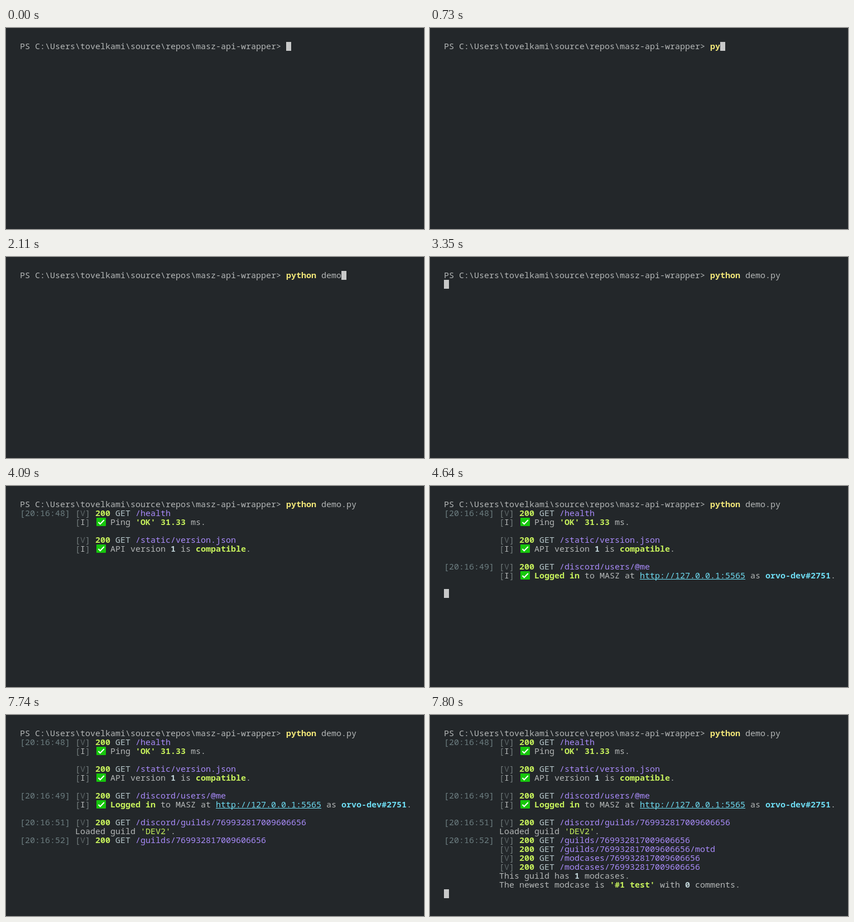
An HTML page for the animation above (8000 ms loop, 749 px wide and 361 px high).

```html
<!DOCTYPE html>
<html lang="en">
<head>
<meta charset="utf-8">
<title>Terminal session</title>
<style>
  html, body { margin: 0; width: 100%; height: 100%; overflow: hidden; background: #23272a; }
  svg { display: block; }
  text { font: 15px "Noto Sans Mono", "DejaVu Sans Mono", monospace; white-space: pre; fill: #b4b7b7; }
  .stamp { fill: #6c7d80; }
  .dim { fill: #737b7d; }
  .faint { fill: #5b6365; }
  .verb { fill: #b4c4c8; }
  .path { fill: #a98bfa; }
  .green { fill: #c6f05c; }
  .cyan { fill: #6edcf2; }
  .light { fill: #bfd2d6; }
  .cmd { fill: #f0e578; }
  .bold { font-weight: 700; }
</style>
</head>
<body>
<svg id="screen" width="749" height="361" viewBox="0 0 749 361"></svg>
<script>
const LOOP = 8000, LEFT = 25, TOP = 25, CELL = 9, LINE = 16;
const screen = document.getElementById('screen');
const colX = c => LEFT + c * CELL;
const rowY = r => TOP + r * LINE;

function add(parent, tag, attrs, content = '') {
  const el = document.createElementNS('http://www.w3.org/2000/svg', tag);
  for (const key in attrs) el.setAttribute(key, attrs[key]);
  el.textContent = content;
  parent.append(el);
  return el;
}

const put = (parent, row, col, content, cls = '') =>
  add(parent, 'text', { x: colX(col), y: rowY(row) + 13, class: cls }, content);

// Runs are [text, class]; each starts where the last one ended.
const lines = [];
function line(row, time, col, runs) {
  const g = add(screen, 'g', {});
  for (const [content, cls] of runs) {
    if (content.trim()) put(g, row, col, content, cls);
    if (cls && cls.includes('link')) {
      add(g, 'rect', { x: colX(col), y: rowY(row) + 14, width: content.length * CELL, height: 1, fill: '#6edcf2' });
    }
    col += content.length;
  }
  lines.push({ g, time });
  return g;
}

function request(row, time, path, stamp) {
  const g = line(row, time, 11, [
    ['[', 'dim'], ['V', 'faint'], [']', 'dim'], [' '],
    ['200', 'green bold'], [' '], ['GET', 'verb'], [' '], [path, 'path']
  ]);
  if (stamp) put(g, row, 0, `[${stamp}]`, 'stamp');
}

function info(row, time, runs) {
  const g = line(row, time, 11, [['[', 'dim'], ['I'], [']', 'dim'], ['    '], ...runs]);
  const x = colX(15) + 2, y = rowY(row);
  add(g, 'rect', { x, y, width: 17, height: 15, rx: 1, fill: '#16c60c' });
  add(g, 'path', { d: `M${x + 3.5} ${y + 8}l3.3 3.3l7-7.3`, fill: 'none', stroke: '#fff', 'stroke-width': 2 });
}

const guild = '769932817009606656';
put(screen, 0, 0, 'PS C:\\Users\\tovelkami\\source\\repos\\masz-api-wrapper>');

request(1, 3770, '/health', '20:16:48');
info(2, 3900, [['Ping '], ["'OK'", 'green bold'], [' '], ['31.33', 'green bold'], [' '], ['ms.']]);
request(4, 4070, '/static/version.json');
info(5, 4090, [['API version '], ['1', 'light bold'], [' '], ['is '], ['compatible', 'green bold'], ['.']]);
request(7, 4170, '/discord/users/@me', '20:16:49');
info(8, 4360, [
  ['Logged in', 'green bold'], [' '], ['to MASZ at '], ['http://127.0.0.1:5565', 'cyan link'],
  [' '], ['as '], ['orvo-dev#2751', 'cyan bold'], ['.']
]);
request(10, 6630, `/discord/guilds/${guild}`, '20:16:51');
line(11, 6730, 11, [['Loaded guild '], ["'DEV2'", 'green'], ['.']]);
request(12, 7740, `/guilds/${guild}`, '20:16:52');
request(13, 7760, `/guilds/${guild}/motd`);
request(14, 7780, `/modcases/${guild}`);
request(15, 7800, `/modcases/${guild}`);
line(16, 7800, 11, [['This guild has '], ['1', 'light bold'], [' '], ['modcases.']]);
line(17, 7800, 11, [['The newest modcase is '], ["'#1 test'", 'green bold'], [' '], ['with '], ['0', 'light bold'], [' '], ['comments.']]);

// Each key hides the cursor for a moment.
const PROMPT = 53, BLINK = 20;
const keys = [600, 710, 930, 1220, 1460, 1550, 1640, 1770, 1880, 1990, 2110, 2360, 2490, 2620];
const program = put(screen, 0, PROMPT, '', 'cmd bold');
const file = put(screen, 0, PROMPT + 7, '');
const cursor = add(screen, 'rect', { width: CELL, height: LINE, fill: '#c8c9c9' });

// Cursor row after Enter; -1 is hidden.
const rows = [
  [3350, 1], [3770, -1], [3790, 2], [3900, -1], [4380, 9], [4620, -1],
  [4640, 10], [6630, 11], [6730, 12], [7740, -1], [7800, 18]
];

function draw(t) {
  const typed = keys.filter(k => k <= t).length;
  program.textContent = 'python'.slice(0, typed);
  file.textContent = 'demo.py'.slice(0, Math.max(0, typed - 7));
  for (const { g, time } of lines) g.setAttribute('visibility', t >= time ? 'visible' : 'hidden');

  let row = 0, col = PROMPT + typed;
  if (t >= rows[0][0]) {
    row = rows.filter(r => r[0] <= t).pop()[1];
    col = 0;
  } else if (typed && typed !== 11 && t < keys[typed - 1] + BLINK) {
    row = -1;
  }
  cursor.setAttribute('visibility', row < 0 ? 'hidden' : 'visible');
  cursor.setAttribute('x', colX(col));
  cursor.setAttribute('y', rowY(row));
}

const start = performance.now();
function tick() {
  draw((performance.now() - start) % LOOP);
  requestAnimationFrame(tick);
}
tick();
</script>
</body>
</html>
```
